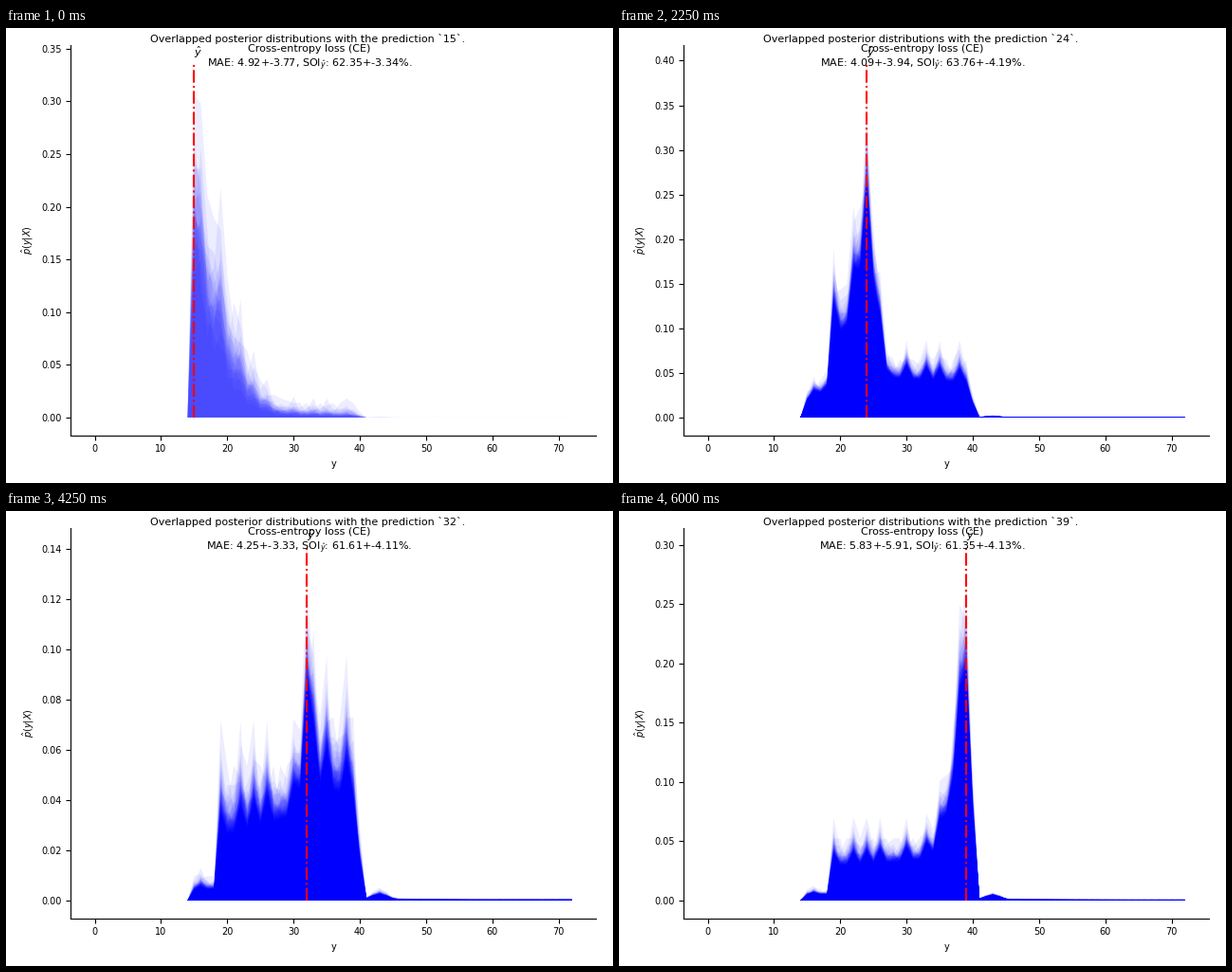
Recreate the animation shown at these times as a matplotlib script. Size 640 by 480 pixels, loop 6250 ms.

```python
import matplotlib.pyplot as plt
import numpy as np
from matplotlib.animation import FuncAnimation
from matplotlib.collections import PolyCollection

plt.rcParams.update({"font.family": "DejaVu Sans", "mathtext.fontset": "dejavusans",
                     "font.size": 7})

W, H, DPI = 640, 480, 100
FIRST, COUNT = 15, 25
ALPHA = 0.07
DENSE = 260

# prediction, top of the marker, curves, MAE, its std, SOI, its std
KEYS = np.array([
    [15, 0.3363, 16, 4.92, 3.77, 62.35, 3.34],
    [20, 0.3470, 260, 3.30, 3.91, 63.04, 4.19],
    [24, 0.3972, 260, 4.09, 3.94, 63.76, 4.19],
    [27, 0.2794, 260, 3.82, 3.08, 63.33, 4.02],
    [30, 0.1519, 220, 4.35, 2.87, 61.15, 4.11],
    [34, 0.1300, 50, 4.16, 3.79, 62.06, 4.11],
    [39, 0.2990, 250, 5.83, 5.91, 61.35, 4.13],
])
X = np.arange(14, 73)
COMMON_AGES = [16, 19, 22, 24, 26, 30, 33, 35, 38]


def envelope(pred, peak):
    """Highest density at each age: a plateau on either side of a bump."""
    dist = X - pred
    left = 0.07 + 0.12 / (1 + np.exp((pred - 28.5) / 0.8))
    right = 0.1 * (1 - np.exp(-(pred - 14) / 5))
    plateau = np.where(dist < 0, left, right)
    width = 0.6 + (pred - 30) ** 2 / 55
    env = plateau + (peak - plateau) * np.exp(-0.5 * (dist / width) ** 2)

    env *= np.where(np.isin(X, COMMON_AGES), 1, 0.75)
    young = (X <= 18) & (dist < 0)
    env *= np.where(young, 0.18 + 0.82 * np.exp(-(dist / 5) ** 2), 1)
    env = np.minimum(env, 0.975 * peak)
    env[X == pred] = peak

    tail = 0.0008 + 0.0035 * np.exp(-((X - 43) / 1.5) ** 2)
    env = np.where(X > 40, tail * (pred - 14) / 15, env)
    env[X == 40] = 0.4 * env[X == 39]
    env[X == 14] = 0
    return env


def posteriors(pred, peak, n):
    """Polygons of all overlapped distributions for one prediction."""
    sparse = np.log(DENSE / n)
    dist = np.minimum(abs(X - pred), 25)
    spread = 0.12 + 0.03 * sparse + dist * (0.004 + 0.007 * sparse)

    # Smooth noise along each curve, ranked so every age has the same spread
    noise = np.random.default_rng(pred).normal(size=(n, X.size + 2))
    noise = noise[:, :-2] + noise[:, 1:-1] + noise[:, 2:]
    u = (noise.argsort(axis=0).argsort(axis=0) + 0.5) / n
    z = np.log(u / (1 - u)) / 1.7

    verts = np.zeros((n, X.size + 2, 2))
    verts[:, 1:-1, 0] = X
    verts[:, 1:-1, 1] = envelope(pred, peak) * np.exp(spread * (z - z.max()))
    verts[:, 0, 0], verts[:, -1, 0] = X[0], X[-1]
    return verts


def heading(y, text=""):
    return fig.text(0.5, 1 - y / H, text, fontsize=8, ha="center", va="top")


fig = plt.figure(figsize=(W / DPI, H / DPI), dpi=DPI, facecolor="white")
ax = fig.add_axes([68.4 / W, 50.4 / H, 553.5 / W, 411.2 / H])
ax.spines[["top", "right"]].set_visible(False)
ax.set_xlim(-3.6, 75.6)
ax.set_xlabel("y")
ax.set_ylabel(r"$\hat{p}(y|X)$")

fills = PolyCollection([], facecolors=(0, 0, 1, ALPHA), edgecolors="none", linewidths=0)
ax.add_collection(fills, autolim=False)
marker, = ax.plot([], [], "r-.", lw=1.5)
label = ax.text(0, 0, r"$\hat{y}$", fontsize=8)
title = heading(6)
heading(5, "\nCross-entropy loss (CE)")


def draw(i):
    pred = FIRST + i
    top, n, mae, mae_std, soi, soi_std = (
        np.interp(pred, KEYS[:, 0], column) for column in KEYS.T[1:])
    ax.set_ylim(-0.05 * top, 1.05 * top)
    fills.set_verts(posteriors(pred, top / 1.1, int(n)))
    marker.set_data([pred, pred], [0, top])
    label.set_position((pred, 1.02 * top))
    title.set_text(
        f"Overlapped posterior distributions with the prediction `{pred}`. \n\n"
        f"MAE: {mae:.2f}+-{mae_std:.2f}, "
        rf"SOI$_{{\hat{{y}}}}$: {soi:.2f}+-{soi_std:.2f}%.")
    return fills, marker, label, title


anim = FuncAnimation(fig, draw, frames=COUNT, interval=250, repeat=True,
                     repeat_delay=0, blit=False)
plt.show()
```
